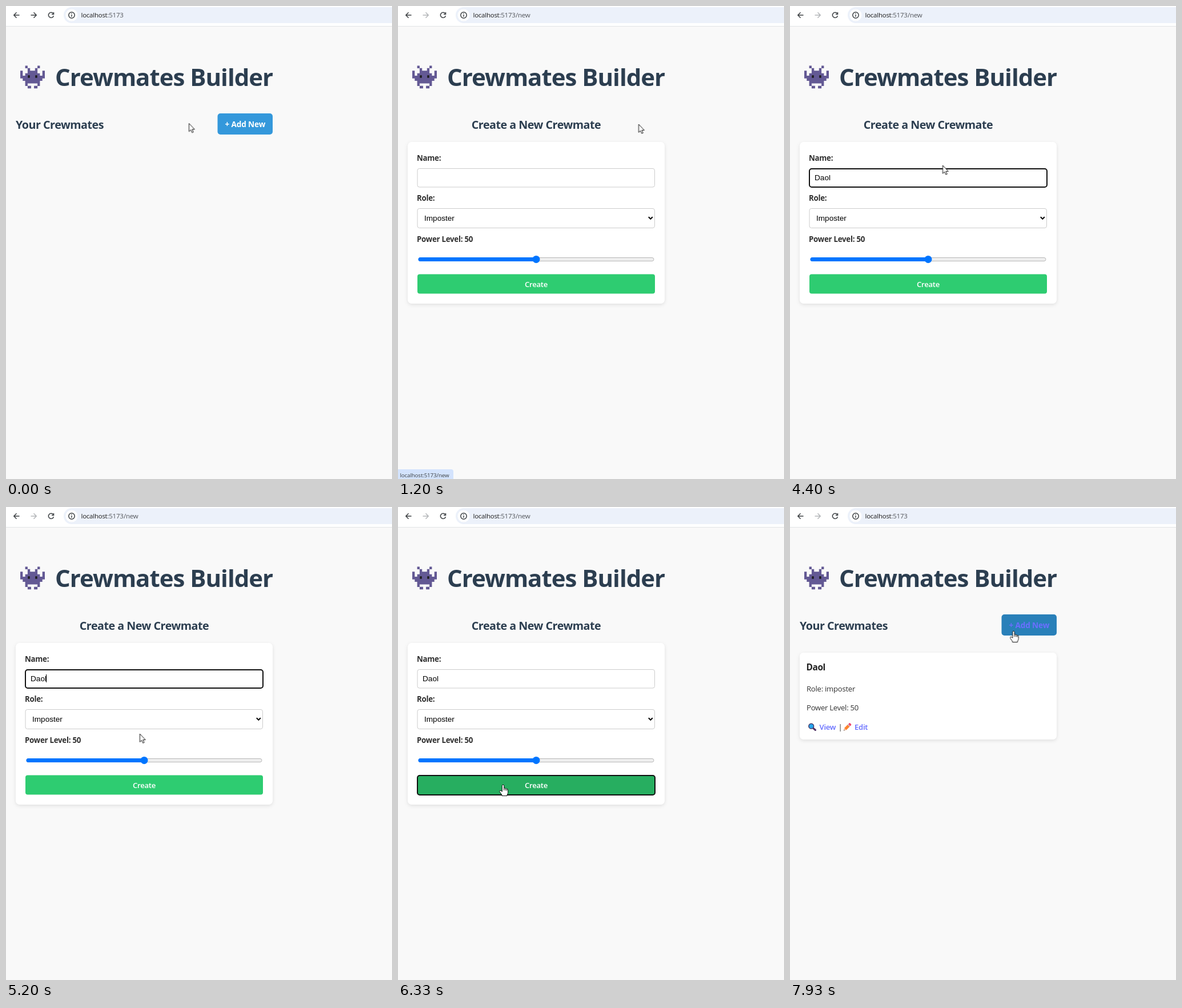
These frames come from a looping animation (676x828 px, 8000 ms). An HTML page:

```html
<!DOCTYPE html>
<html lang="en">
<head>
<meta charset="utf-8">
<title>Crewmates Builder</title>
<style>
html, body { margin: 0; width: 100%; height: 100%; overflow: hidden; background: #f9f9f9; }
svg { display: block; width: 676px; height: 828px; }
text { font-family: "Open Sans", "Noto Sans", sans-serif; white-space: pre; }

/* Type */
.title { font-size: 42px; font-weight: 700; letter-spacing: -.024em; fill: #2c3e50; }
.head { font-size: 19.7px; font-weight: 700; letter-spacing: -.025em; fill: #2c3e50; }
.label { font-size: 13.3px; font-weight: 700; letter-spacing: -.02em; fill: #2f2f2f; }
.name { font-size: 15.4px; font-weight: 700; letter-spacing: -.024em; fill: #222; }
.body { font-size: 13.1px; letter-spacing: -.019em; fill: #333; }
.link { font-weight: 600; fill: #646cff; }
.field { font: 13.6px "Liberation Sans", Arial, sans-serif; fill: #000; }
.url { font-size: 11.5px; letter-spacing: -.25px; fill: #1f1f1f; }
.url tspan { fill: #52555a; }
.tip { font-size: 9.8px; letter-spacing: -.15px; fill: #3c4043; }
.add-text { font-size: 13.6px; font-weight: 700; letter-spacing: -.01em; fill: #fff; }
.create-text { font-size: 13.2px; font-weight: 600; letter-spacing: -.02em; fill: #fff; }

/* Shapes */
.card { fill: #fff; filter: drop-shadow(0 2px 3px rgba(0, 0, 0, .1)); }
.box { fill: #fff; stroke: #ccc; }
.ring { fill: none; stroke: #101010; stroke-width: 2; }
.icon { fill: none; stroke: #3c4043; stroke-width: 1.5; }

/* Cuts: every percent is ms / 80 */
.list, .card-item, .form, .path, .next, .focus, .pressed, .caret, .caret-x,
.arrow, .hand, .beam, .typed tspan { animation: 8s step-end infinite; }
.list { animation-name: list; }
.card-item { animation-name: item; }
.form, .path { animation-name: form; }
.next { animation-name: next; }
.focus { animation-name: focus; }
.pressed { animation-name: pressed; }
.caret { animation-name: blink; }
.caret-x { animation-name: advance; }
.arrow { animation-name: arrow; }
.hand { animation-name: hand; }
.beam { animation-name: beam; }
.typed tspan:nth-child(1) { animation-name: key1; }
.typed tspan:nth-child(2) { animation-name: key2; }
.typed tspan:nth-child(3) { animation-name: key3; }
.typed tspan:nth-child(4) { animation-name: key4; }

@keyframes list { 0%, 81.625% { opacity: 1 } 14.125% { opacity: 0 } 100% { opacity: 1 } }
@keyframes item { 0% { opacity: 0 } 81.625%, 100% { opacity: 1 } }
@keyframes form { 0%, 81.625%, 100% { opacity: 0 } 14.125% { opacity: 1 } }
@keyframes next { 0% { stroke: #3c4043 } 14.125%, 100% { stroke: #b4b6b9 } }
@keyframes focus { 0%, 79.125%, 100% { opacity: 0 } 24.125% { opacity: 1 } }
@keyframes pressed { 0% { opacity: 0 } 79.125%, 100% { opacity: 1 } }
@keyframes blink {
  0%, 30.875%, 55%, 68.375%, 79.125%, 100% { opacity: 0 }
  24.125%, 37.5%, 61.625%, 75% { opacity: 1 }
}
@keyframes advance {
  0% { transform: none }
  42.5% { transform: translateX(9px) }
  45.875% { transform: translateX(17px) }
  47.5% { transform: translateX(24px) }
  48.375%, 100% { transform: translateX(27px) }
}
@keyframes key1 { 0% { fill: transparent } 42.5%, 100% { fill: #000 } }
@keyframes key2 { 0% { fill: transparent } 45.875%, 100% { fill: #000 } }
@keyframes key3 { 0% { fill: transparent } 47.5%, 100% { fill: #000 } }
@keyframes key4 { 0% { fill: transparent } 48.375%, 100% { fill: #000 } }
@keyframes arrow {
  0%, 14.125%, 31.625%, 58.5%, 82.5% { opacity: 1 }
  6.25%, 21.875%, 56.25%, 66.625%, 93.75%, 100% { opacity: 0 }
}
@keyframes hand {
  0%, 14.125%, 82.5% { opacity: 0 }
  6.25%, 66.625%, 93.75%, 100% { opacity: 1 }
}
@keyframes beam {
  0%, 31.625%, 58.5%, 100% { opacity: 0 }
  21.875%, 56.25% { opacity: 1 }
}

/* Transitions and pointer travel */
.add { animation: add 8s linear infinite; }
.add-text { animation: add-text 8s linear infinite; }
.create { animation: create 8s linear infinite; }
.status { animation: status 8s linear infinite; }
.pointer { animation: travel 8s linear infinite; }

@keyframes add {
  0%, 6.25%, 81.625%, 93.75% { fill: #3498db }
  8.75%, 14.125%, 96.25%, 100% { fill: #2980b9 }
}
@keyframes add-text {
  0%, 6.25%, 81.625%, 93.75% { fill: #fff }
  8.75%, 14.125%, 96.25%, 100% { fill: #6b6eff }
}
@keyframes create {
  0%, 66.625% { fill: #2ecc71 }
  68.9%, 100% { fill: #27ae60 }
}
@keyframes status {
  0%, 8.375%, 19.5%, 100% { opacity: 0 }
  10%, 17.5% { opacity: 1 }
}
@keyframes travel {
  0% { transform: translate(320.5px, 205.5px) }
  1.625% { transform: translate(320.5px, 205.5px); animation-timing-function: ease-in-out }
  10.875% { transform: translate(421.5px, 207px) }
  15% { transform: translate(421.5px, 207px); animation-timing-function: ease-in-out }
  23.375%, 28.375% { transform: translate(262px, 299px) }
  32.5%, 55.375% { transform: translate(267.5px, 279px) }
  61.625%, 64.125% { transform: translate(250px, 357px) }
  66.625% { transform: translate(206px, 470px) }
  69.125% { transform: translate(198.5px, 473px) }
  73.375%, 85.875% { transform: translate(184px, 486px) }
  86.625% { transform: translate(181px, 476.5px); animation-timing-function: ease-in-out }
  93.75% { transform: translate(371px, 226px) }
  96.625% { transform: translate(381px, 222px) }
  99.125%, 100% { transform: translate(391.5px, 217px) }
}
</style>
</head>
<body>
<svg viewBox="0 0 676 828">
  <rect width="676" height="828" fill="#f9f9f9"/>

  <!-- Browser bar -->
  <rect width="676" height="35" fill="#fff"/>
  <rect y="35" width="676" height="1" fill="#e1e3e6"/>
  <rect x="101" y="2" width="620" height="28" rx="14" fill="#ecf1fa"/>
  <circle cx="115" cy="16" r="10.5" fill="#fff"/>
  <path class="icon" d="M23.5 16H14M18.5 11.3L13.8 16L18.5 20.7"/>
  <path class="icon next" d="M43.5 16H53M48.5 11.3L53.2 16L48.5 20.7"/>
  <path class="icon" d="M82.6 13A4.6 4.6 0 1 0 83.4 17.2M83.5 11V14.4H80"/>
  <circle class="icon" cx="115" cy="16" r="5.2"/>
  <path class="icon" d="M115 15.2V18.8M115 12.8V14.1"/>
  <text class="url" x="131.5" y="20">localhost<tspan>:5173</tspan></text>
  <g class="path"><text class="url" x="206" y="20"><tspan>/new</tspan></text></g>

  <!-- Page title -->
  <g transform="translate(25 104.5) scale(4.3 4.42)">
    <path stroke="#635994" stroke-width="1.04" d="M2 .5h1M7 .5h1M3 1.5h1M6 1.5h1M0 2.5h1M3 2.5h4M9 2.5h1M0 3.5h1M2 3.5h6M9 3.5h1M0 4.5h10M1 5.5h8M2 6.5h6M2 7.5h1M7 7.5h1M3 8.5h1.4M5.6 8.5h1.4"/>
    <path stroke="#1c1c1c" d="M3.1 4.3h.8M6.1 4.3h.8"/>
  </g>
  <text class="title" x="86" y="139.5">Crewmates Builder</text>

  <!-- Crew list -->
  <g class="list">
    <text class="head" x="17" y="215">Your Crewmates</text>
    <rect class="add" x="370.5" y="188" width="96.5" height="37" rx="5"/>
    <text class="add-text" x="383.5" y="212">+ Add New</text>
    <g class="card-item">
      <rect class="card" x="17" y="255" width="450" height="152" rx="6.5"/>
      <text class="name" x="28.5" y="286">Daol</text>
      <text class="body" x="29" y="322.5">Role: imposter</text>
      <text class="body" x="29" y="356">Power Level: 50</text>
      <path d="M40.5 387L44.5 390.5" stroke="#533566" stroke-width="3" stroke-linecap="round"/>
      <circle cx="37.2" cy="383.7" r="4.4" fill="#26a5ee" stroke="#433b6b" stroke-width="1.5"/>
      <text class="body link" x="51.5" y="389.5">View</text>
      <text class="body" x="84.5" y="389.5">|</text>
      <g transform="translate(94 391.5) rotate(-45)">
        <path d="M0 0L4 -2.5V2.5Z" fill="#f3c6a0"/>
        <path d="M0 0L1.6 -1V1Z" fill="#433b4b"/>
        <rect x="4" y="-2.5" width="9" height="5" fill="#ff822d"/>
        <rect x="12" y="-2.5" width="1.6" height="5" fill="#c9c9d0"/>
        <rect x="13.6" y="-2.5" width="3.6" height="5" rx="1.4" fill="#f0456d"/>
      </g>
      <text class="body link" x="113" y="389.5">Edit</text>
    </g>
  </g>

  <!-- New crewmate form -->
  <g class="form">
    <text class="head" x="242" y="215" text-anchor="middle">Create a New Crewmate</text>
    <rect class="card" x="17" y="238" width="450" height="283" rx="7"/>
    <text class="label" x="33" y="270.7">Name:</text>
    <rect class="box" x="34" y="284.5" width="415.5" height="32.5" rx="3.5"/>
    <rect class="ring focus" x="34" y="285" width="416" height="32" rx="4"/>
    <text class="field typed" x="43" y="305"><tspan>D</tspan><tspan>a</tspan><tspan>o</tspan><tspan>l</tspan></text>
    <g class="caret"><rect class="caret-x" x="43" y="293" width="1" height="14"/></g>

    <text class="label" x="33" y="341">Role:</text>
    <rect class="box" x="34" y="354.5" width="415.5" height="34" rx="3.5"/>
    <text class="field" x="46" y="376.3">Imposter</text>
    <path d="M438.8 369.3L442.3 372.9L445.8 369.3" fill="none" stroke="#000" stroke-width="2"/>

    <text class="label" x="33" y="412.5">Power Level: 50</text>
    <rect x="36" y="440.5" width="412" height="6" rx="3" fill="#efefef" stroke="#b8b8b8"/>
    <rect x="35.5" y="440" width="207" height="7" rx="3.5" fill="#0075ff"/>
    <circle cx="242" cy="443.4" r="6.5" fill="#0075ff"/>

    <rect class="create" x="34" y="469.5" width="416" height="34" rx="4"/>
    <rect class="ring pressed" x="34" y="470" width="416" height="34" rx="4"/>
    <text class="create-text" x="242" y="492.2" text-anchor="middle">Create</text>
  </g>

  <!-- Link preview -->
  <g class="status">
    <rect x="-6" y="811" width="103" height="24" rx="4" fill="#d3e3fd"/>
    <text class="tip" x="3.5" y="824.6">localhost:5173/new</text>
  </g>

  <!-- Pointer -->
  <g class="pointer" fill="#fff" stroke="#111" stroke-linejoin="round">
    <path class="arrow" d="M0 0V14.3L3.2 11.3L5.4 16.2L7.7 15.2L5.5 10.4H9.8Z"/>
    <g class="hand">
      <path d="M-1.7 1.7Q-1.7 .3 0 .3T1.7 1.7V6.2Q3.2 5.3 4.2 6.8Q5.8 6 6.6 7.6Q8.6 7.2 8.6 9.5V13.5Q8.6 16 7 18V19.6H-2V18L-6 12.4Q-6.6 11 -5.2 10.4Q-3.8 10 -1.7 12.2Z"/>
      <path d="M1.7 6.2V10M4.3 7V10.3M6.6 7.6V10.6" fill="none"/>
    </g>
    <path class="beam" d="M-3 -7.5H-1L0 -6.8L1 -7.5H3M0 -6.8V6.8M-3 7.5H-1L0 6.8L1 7.5H3" fill="none"/>
  </g>
</svg>
</body>
</html>
```
